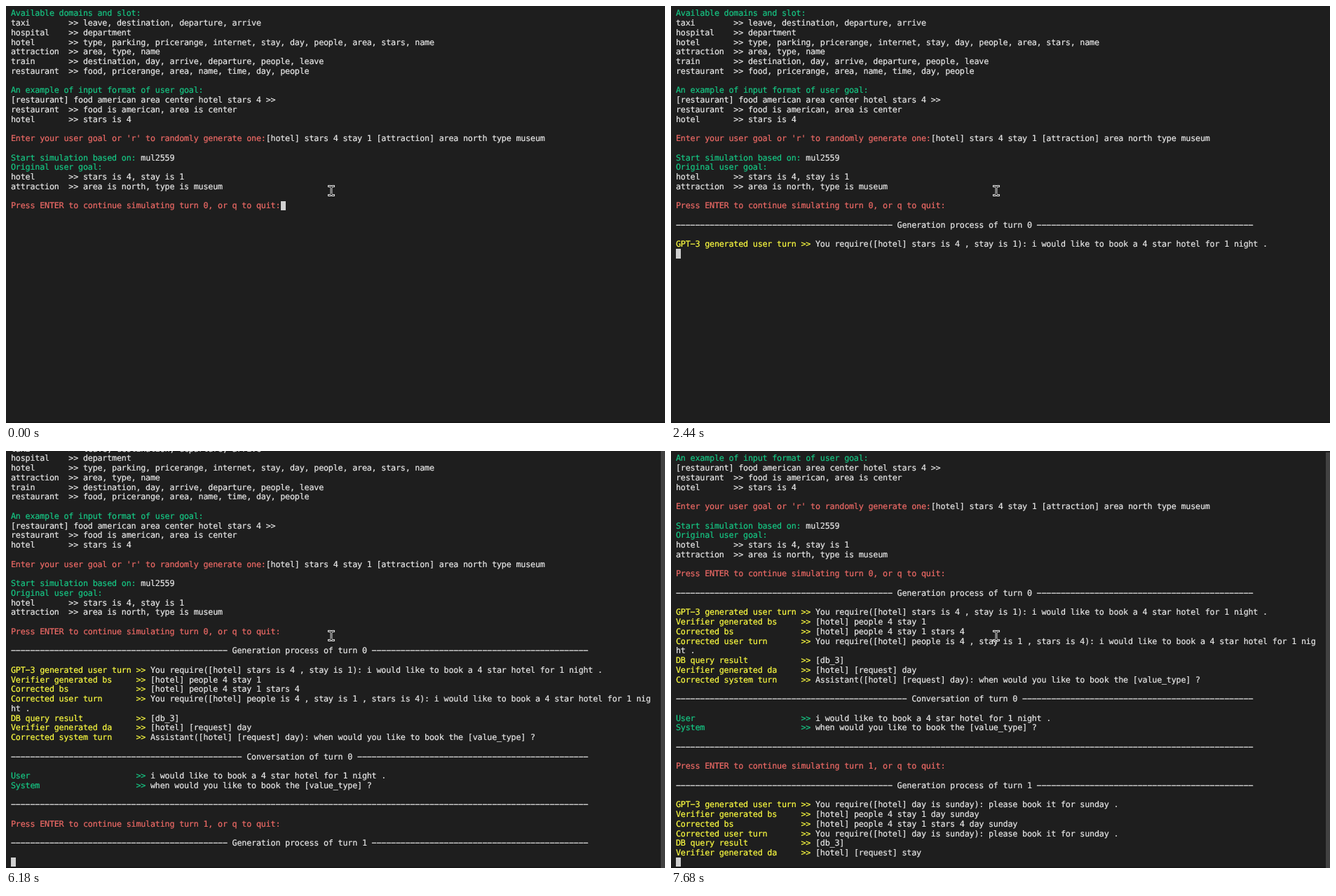
Recreate the animation shown at these times as an HTML page. Size 940 by 596 pixels, loop 8 s.

```html
<!DOCTYPE html>
<html lang="en">
<head>
<meta charset="utf-8">
<title>Dialogue simulation terminal</title>
<style>
  html, body { margin: 0; width: 100%; height: 100%; overflow: hidden; background: #1e1e1e; }
  #screen {
    --line: 13.75px;
    --char: 6.87px;
    position: relative; width: 940px; height: 596px; overflow: hidden;
    background: #1e1e1e;
    animation: session 8s step-end infinite;
  }
  #scroll { position: absolute; left: 7px; top: calc(3.6px - var(--shift) * var(--line)); }
  /* The terminal cell is a little narrower than the font's natural advance. */
  #log {
    position: relative; top: .8px;
    margin: 0; width: 930px; overflow: hidden;
    height: calc(var(--rows) * var(--line));
    font: 11.78px/13.75px "DejaVu Sans Mono", monospace;
    letter-spacing: calc(var(--char) - .60205em);
    font-variant-ligatures: none;
    text-rendering: geometricPrecision;
    -webkit-text-stroke: .2px;
    color: #e8e8e8;
  }
  .green { color: #16c784; }
  .red { color: #ee6a66; }
  .yellow { color: #fcfc40; }
  #caret {
    position: absolute; width: 7px; height: var(--line);
    left: calc(var(--col) * var(--char));
    top: calc(var(--row) * var(--line));
    background: #d0d0d0;
  }
  #bar {
    position: absolute; left: 934px; right: 0; top: var(--bar-top); bottom: 0;
    background: #424242; opacity: var(--bar);
  }
  #edge { position: absolute; left: 0; right: 0; bottom: 0; height: 2px; background: #181818; }
  #pointer { position: absolute; left: 456px; top: 253.5px; }

  /* rows: lines printed; row/col: caret cell; shift: lines scrolled away */
  @keyframes session {
    0%      { --rows: 21; --row: 20; --col: 56; --shift: 0; --bar: 0; --bar-top: 0px; }
    6.25%   { --rows: 23; --row: 24; --col: 0;  --shift: 0; --bar: 0; --bar-top: 0px; }
    30.5%   { --rows: 25; --row: 25; --col: 0;  --shift: 0; --bar: 0; --bar-top: 0px; }
    32.375% { --rows: 31; --row: 31; --col: 0;  --shift: 0; --bar: 0; --bar-top: 0px; }
    47.25%  { --rows: 41; --row: 40; --col: 56; --shift: 0; --bar: 0; --bar-top: 0px; }
    77.25%  { --rows: 43; --row: 44; --col: 0;  --shift: 2; --bar: 1; --bar-top: 0px; }
    92.25%  { --rows: 49; --row: 49; --col: 0;  --shift: 7; --bar: 1; --bar-top: 0px; }
    96%, 100% { --rows: 50; --row: 50; --col: 0; --shift: 8; --bar: 1; --bar-top: 2px; }
  }
</style>
</head>
<body>
<div id="screen">
  <div id="scroll"><pre id="log"></pre><div id="caret"></div></div>
  <div id="edge"></div>
  <div id="bar"></div>
  <svg id="pointer" width="16" height="20" fill="none" stroke-linecap="square">
    <defs>
      <path id="beam" d="M4.5 3.5H6Q8 3.5 8 5.5Q8 3.5 10 3.5H11.5M8 5.5V14.5M4.5 16.5H6Q8 16.5 8 14.5Q8 16.5 10 16.5H11.5"/>
    </defs>
    <use href="#beam" stroke="#eee" stroke-width="2.8"/>
    <use href="#beam" stroke="#111" stroke-width="1"/>
  </svg>
</div>
<script>
  const paint = color => text => `<span class="${color}">${text}</span>`;
  const green = paint('green'), red = paint('red'), yellow = paint('yellow');

  const slot = (name, text) => `${name.padEnd(12)}>> ${text}`;
  const step = (name, text, color = yellow) => `${color(name.padEnd(26) + '>>')} ${text}`;
  const rule = title => {
    const side = '\u2212'.repeat((118 - title.length) / 2);
    return `${side} ${title} ${side}`;
  };
  const prompt = turn => red(`Press ENTER to continue simulating turn ${turn}, or q to quit:`);
  const generated = 'GPT\u22123 generated user turn';

  document.getElementById('log').innerHTML = [
    green('Available domains and slot:'),
    slot('taxi', 'leave, destination, departure, arrive'),
    slot('hospital', 'department'),
    slot('hotel', 'type, parking, pricerange, internet, stay, day, people, area, stars, name'),
    slot('attraction', 'area, type, name'),
    slot('train', 'destination, day, arrive, departure, people, leave'),
    slot('restaurant', 'food, pricerange, area, name, time, day, people'),
    '',
    green('An example of input format of user goal:'),
    '[restaurant] food american area center hotel stars 4 >>',
    slot('restaurant', 'food is american, area is center'),
    slot('hotel', 'stars is 4'),
    '',
    red("Enter your user goal or 'r' to randomly generate one:") +
      '[hotel] stars 4 stay 1 [attraction] area north type museum',
    '',
    green('Start simulation based on:') + ' mul2559',
    green('Original user goal:'),
    slot('hotel', 'stars is 4, stay is 1'),
    slot('attraction', 'area is north, type is museum'),
    '',
    prompt(0),
    '',
    rule('Generation process of turn 0'),
    '',
    step(generated, 'You require([hotel] stars is 4 , stay is 1): i would like to book a 4 star hotel for 1 night .'),
    step('Verifier generated bs', '[hotel] people 4 stay 1'),
    step('Corrected bs', '[hotel] people 4 stay 1 stars 4'),
    step('Corrected user turn', 'You require([hotel] people is 4 , stay is 1 , stars is 4): i would like to book a 4 star hotel for 1 nig'),
    'ht .',
    step('DB query result', '[db_3]'),
    step('Verifier generated da', '[hotel] [request] day'),
    step('Corrected system turn', 'Assistant([hotel] [request] day): when would you like to book the [value_type] ?'),
    '',
    rule('Conversation of turn 0'),
    '',
    step('User', 'i would like to book a 4 star hotel for 1 night .', green),
    step('System', 'when would you like to book the [value_type] ?', green),
    '',
    '\u2212'.repeat(120),
    '',
    prompt(1),
    '',
    rule('Generation process of turn 1'),
    '',
    step(generated, 'You require([hotel] day is sunday): please book it for sunday .'),
    step('Verifier generated bs', '[hotel] people 4 stay 1 day sunday'),
    step('Corrected bs', '[hotel] people 4 stay 1 stars 4 day sunday'),
    step('Corrected user turn', 'You require([hotel] day is sunday): please book it for sunday .'),
    step('DB query result', '[db_3]'),
    step('Verifier generated da', '[hotel] [request] stay'),
  ].join('\n');
</script>
</body>
</html>
```
